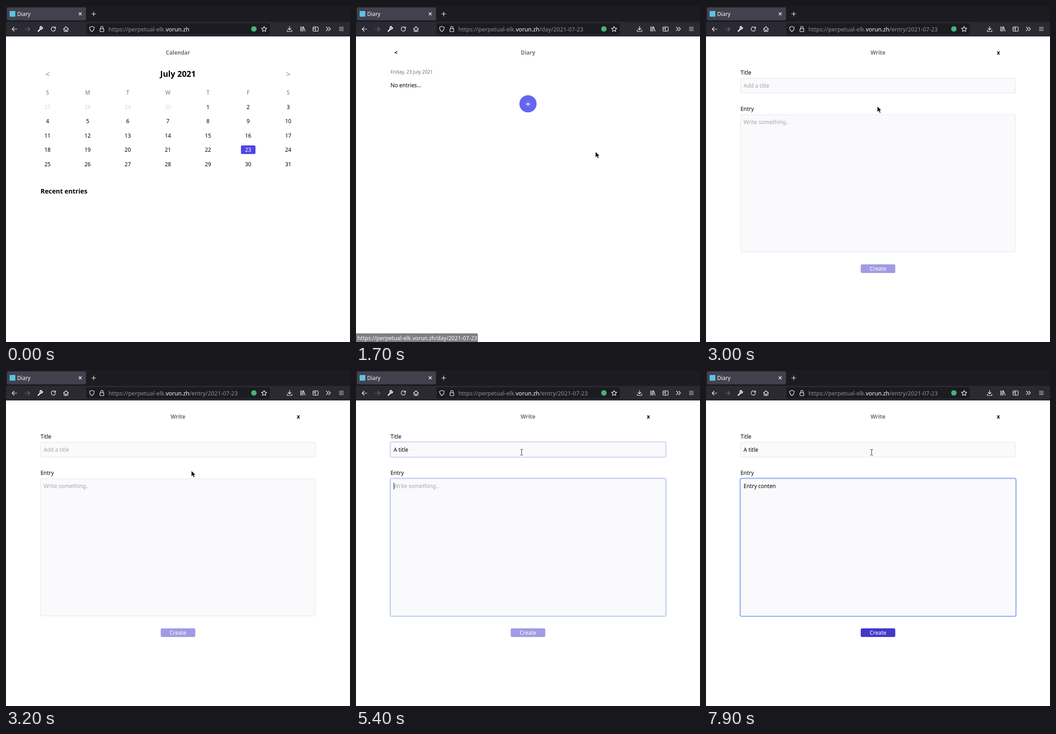
An HTML page that plays this animation: 757x740 px, repeating every 8 s.

```html
<!DOCTYPE html>
<html lang="en">
<head>
<meta charset="utf-8">
<title>Diary</title>
<style>
  html, body { margin: 0; width: 100%; height: 100%; overflow: hidden; background: #fff; }
  svg { display: block; width: 757px; height: 740px; }
  text { font: 11.9px "Noto Sans", "Open Sans", sans-serif; fill: #000; white-space: pre; }
  .mid { text-anchor: middle; }
  .bold { font-weight: 700; }
  .gray { fill: #71717a; }
  .pale { fill: #d4d4d8; }
  .hint { fill: #a5a5ac; }
  .small { font-size: 10.4px; }
  .month { font-size: 17.8px; }
  .recent { font-size: 14.25px; }
  .arrow { font-size: 17px; fill: #7c83e6; }
  .white { fill: #fff; }
  .bar { font-size: 12.65px; fill: #8f8f9a; }
  .bar .host, .tab { fill: #fbfbfe; }
  .status { font-size: 12.15px; fill: #fff; }
  .icons { fill: none; stroke: #fbfbfe; stroke-width: 1.2; stroke-linecap: round; stroke-linejoin: round; }
  .field { fill: #fafafc; stroke: #e4e4ea; }
  .ring { fill: none; stroke: #9db6ee; stroke-width: 2.6; }
  .caret { stroke: #000; }
</style>
</head>
<body>
<svg viewBox="0 0 757 740">
  <rect width="757" height="740" fill="#fff"/>

  <!-- browser chrome -->
  <rect width="757" height="35" fill="#1c1b22"/>
  <rect y="35" width="757" height="32" fill="#2b2a33"/>
  <rect y="66" width="757" height="1" fill="#18171d"/>
  <rect x="2" y="3" width="174" height="28.500" rx="3" fill="#42414d"/>
  <rect x="8" y="11" width="12.500" height="12.500" fill="#58c4e6"/>
  <text class="tab" x="24.500" y="22">Diary</text>
  <rect x="177" y="38" width="403.500" height="25" rx="3" fill="#1c1b22"/>
  <text class="bar" x="225.500" y="55.500">https://perpetual-elk.<tspan class="host">vorun.zh</tspan><tspan id="path"></tspan></text>
  <circle cx="545.500" cy="50.500" r="6" fill="#48b27c"/>
  <g class="icons">
    <path d="M160.500 14.500l5.500 5.500m0-5.500l-5.500 5.500M188.500 17.500h9m-4.500-4.500v9"/>
    <path d="M24 51H13.500m4.500-4.500L13.500 51l4.500 4.500"/>
    <path d="M42 51h10.500M48 46.500l4.500 4.500-4.500 4.500" stroke="#6f6e79"/>
    <path d="M71 55.500l5-5" stroke-width="2.600"/>
    <path d="M80.500 47.500a3 3 0 1 1-2.500-2.500l-1 2 1.500 1.500z" stroke-width="1.700"/>
    <path d="M108 48a4.700 4.700 0 1 0 .8 3M109 45.500v3.500h-3.500"/>
    <path d="M126.500 51l5.500-5.500 5.500 5.500M128 50v6h8v-6M131 56v-3.500h2V56"/>
    <path d="M189 45l5 1.800c0 4-1 7.500-5 9.700-4-2.200-5-5.700-5-9.700z"/>
    <rect x="206.800" y="50" width="8.400" height="6.500" rx="1"/>
    <path d="M208.500 50v-2.500a2.500 2.500 0 0 1 5 0V50"/>
    <path d="M568 45l1.700 3.700 4.100.5-3 2.700.8 4.100-3.600-2-3.600 2 .8-4.100-3-2.700 4.100-.5z"/>
    <path d="M624 45v7.500m-3-3l3 3 3-3M619 53v3h10v-3"/>
    <path d="M648.500 45.500v10m2.700-10v10m2.600-10v10m1-9.500l3.400 9.500"/>
    <rect x="675.500" y="46" width="11.500" height="9.500" rx="1.500"/>
    <path d="M681 46v9.500m-3.500-7h1.500m-1.500 2.200h1.500"/>
    <path d="M705 46.500l4 4-4 4m5-8l4 4-4 4"/>
    <path d="M733.500 47h9m-9 3.500h9m-9 3.500h9"/>
  </g>

  <g id="calendar">
    <text class="mid bold gray" x="378.500" y="106.500">Calendar</text>
    <text class="mid arrow" x="91.500" y="156">&lt;</text>
    <text class="mid bold month" x="378.500" y="156">July 2021</text>
    <text class="mid arrow" x="621" y="156">&gt;</text>
    <rect x="517" y="307" width="32" height="19" rx="3" fill="#4f46e5"/>
    <g id="days"></g>
    <text class="bold recent" x="76" y="412.500">Recent entries</text>
  </g>

  <g id="day">
    <text class="mid bold" x="88" y="107">&lt;</text>
    <text class="mid bold gray" x="378.500" y="106.500">Diary</text>
    <text class="small gray" x="76" y="148.500">Friday, 23 July 2021</text>
    <text x="76" y="179">No entries...</text>
    <circle cx="378.500" cy="215.500" r="19" fill="#6366f1"/>
    <path d="M373.500 216h10m-5-5v10" stroke="#fff" stroke-width="1.300"/>
  </g>

  <g id="write">
    <text class="mid bold gray" x="378.500" y="106.500">Write</text>
    <text class="mid bold" x="643.500" y="107">x</text>
    <text x="76" y="150.500">Title</text>
    <rect class="field" x="76" y="159" width="605" height="32.500" rx="2.500"/>
    <rect class="ring" id="titleRing" x="75.200" y="158" width="607" height="34.200" rx="3.500"/>
    <text id="title" x="82.800" y="179.500"></text>
    <text x="76" y="231">Entry</text>
    <rect class="field" x="76" y="239.500" width="605" height="302" rx="2.500"/>
    <rect class="ring" id="entryRing" x="75.200" y="238.500" width="607" height="304" rx="3.500"/>
    <text id="entry" x="82.800" y="260"></text>
    <path class="caret" id="caret" d="M.5 0v15"/>
    <rect id="button" x="340.500" y="569" width="76" height="19" rx="3"/>
    <text class="mid white" x="378.500" y="583">Create</text>
  </g>

  <g id="status">
    <path id="statusBox" fill="#38383d"/>
    <text class="status" id="link" x="3" y="735.500"></text>
  </g>

  <g id="cursor">
    <path id="pointer" d="M0 0v12.500l3-2.700 2.200 4.700 2.200-1-2.200-4.600h4z" fill="#000" stroke="#fff" stroke-width=".7"/>
    <path id="hand" d="M-2 0q1.200-1.500 2.200 0v3.500l5 1.200q1.600.5 1.300 2.300L5.500 11H-1.500l-2.500-4q-.5-1.500 1-1l1 .8z" fill="#000" stroke="#fff" stroke-width=".7"/>
    <path id="beam" d="M-2.500-6H-.5L.5-5.300 1.500-6h2M.5-5.300V5.800M-2.500 6.500H-.5l1-.7 1 .7h2" fill="none" stroke="#222"/>
  </g>
</svg>
<script>
const LOOP = 8000, STEP = 100;
const el = Object.fromEntries([...document.querySelectorAll('[id]')].map(n => [n.id, n]));
const show = (node, on) => { node.style.display = on ? '' : 'none'; };
const within = (t, from, to) => t >= from && t < to;

function addCell(label, col, y, tone) {
  const cell = document.createElementNS('http://www.w3.org/2000/svg', 'text');
  cell.setAttribute('class', 'mid ' + tone);
  cell.setAttribute('x', 91.3 + 88.3 * col);
  cell.setAttribute('y', y);
  cell.textContent = label;
  el.days.append(cell);
}
[...'SMTWTFS'].forEach((name, col) => addCell(name, col, 194.5, 'gray'));
for (let i = 0; i < 35; i++) {
  const date = i < 4 ? 27 + i : i - 3;
  const tone = i < 4 ? 'pale' : date === 23 ? 'white' : '';
  addCell(date, i % 7, 226.5 + 31.55 * Math.floor(i / 7), tone);
}

// start, end, from x, from y, to x, to y
const moves = [
  [700, 1300, 733, 727, 527, 321],
  [1700, 2500, 527, 321, 377, 221],
  [3000, 3200, 377, 221, 408, 222],
  [3300, 3600, 408, 222, 364, 181]
];
function cursorAt(t) {
  const [start, end, x0, y0, x1, y1] = moves.findLast(m => t >= m[0]) || moves[0];
  const p = Math.min(1, Math.max(0, (t - start) / (end - start)));
  const k = p * p * (3 - 2 * p);
  return [x0 + (x1 - x0) * k, y0 + (y1 - y0) * k];
}

// the time each letter is typed
const titleKeys = [4100, 4200, 4400, 4500, 4600, 4800, 5100];
const entryKeys = [6200, 6400, 6500, 6600, 6800, 6900, 7000, 7100, 7200, 7300, 7500, 7700];
const typed = (text, keys, t) => text.slice(0, keys.filter(k => k <= t).length);

function fill(node, value, hint) {
  node.textContent = value || hint;
  node.classList.toggle('hint', !value);
}

function drawStatus(t) {
  const second = t >= 2500;
  const alpha = within(t, 1400, 1700) || within(t, 2600, 3000) ? 1
    : within(t, 1300, 1400) || within(t, 2500, 2600) ? .7
    : within(t, 1700, 1800) ? .64 : 0;
  el.status.style.opacity = alpha;
  el.statusBox.setAttribute('d', `M0 721H${second ? 275 : 265}q3 0 3 3V740H0z`);
  el.link.textContent = 'https://perpetual-elk.vorun.zh/' + (second ? 'entry' : 'day') + '/2021-07-23';
}

function drawForm(t) {
  const inEntry = t >= 5400;
  const title = typed('A title', titleKeys, t);
  const entry = typed('Entry conten', entryKeys, t);
  fill(el.title, title, 'Add a title');
  fill(el.entry, entry, 'Write something..');
  el.titleRing.style.opacity = within(t, 3700, 5400) ? 1 : within(t, 5400, 5500) ? .4 : 0;
  el.entryRing.style.opacity = t >= 5500 ? 1 : inEntry ? .6 : 0;
  el.button.setAttribute('fill', entry ? '#4338ca' : '#a29be3');

  const node = inEntry ? el.entry : el.title;
  const width = (inEntry ? entry : title) ? node.getComputedTextLength() : 0;
  show(el.caret, within(t, 3700, 7900));
  el.caret.setAttribute('transform', `translate(${Math.round(82.8 + width)} ${inEntry ? 248 : 167.5})`);
}

function drawCursor(t) {
  const [x, y] = cursorAt(t);
  const hand = within(t, 1300, 1700) || within(t, 2500, 3000);
  const beam = t >= 3500;
  show(el.cursor, t >= 700);
  show(el.hand, hand);
  show(el.beam, beam);
  show(el.pointer, !hand && !beam);
  el.cursor.setAttribute('transform', `translate(${x} ${y})`);
}

function render(now) {
  const t = Math.floor(now % LOOP / STEP) * STEP;
  show(el.calendar, t < 1700);
  show(el.day, within(t, 1700, 3000));
  show(el.write, t >= 3000);
  el.path.textContent = t < 1700 ? '' : t < 3000 ? '/day/2021-07-23' : '/entry/2021-07-23';
  drawStatus(t);
  drawForm(t);
  drawCursor(t);
}

const start = performance.now();
function tick() {
  render(performance.now() - start);
  requestAnimationFrame(tick);
}
tick();
</script>
</body>
</html>
```
